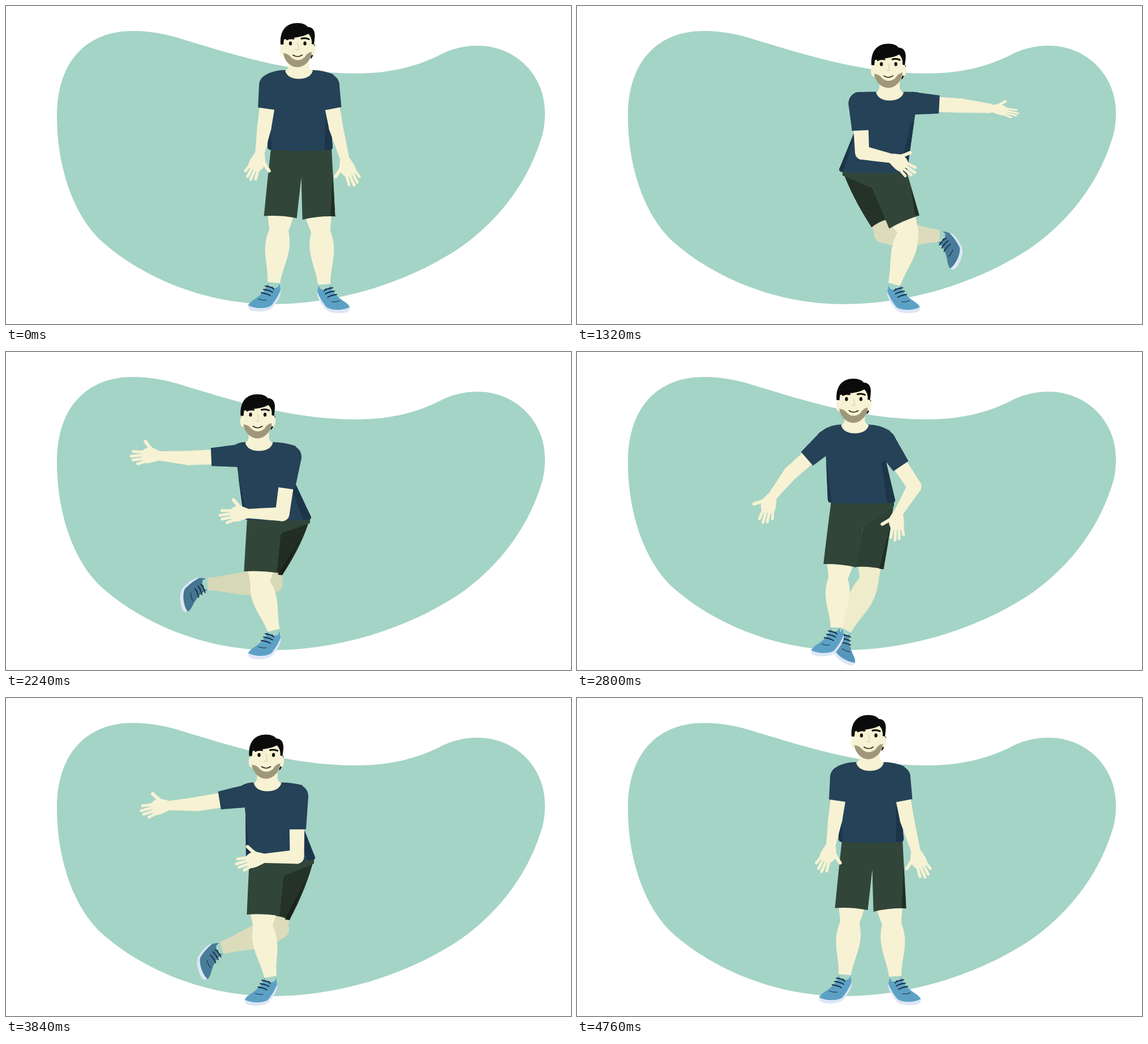
An HTML page with a canvas that plays this animation: 998x561 px, repeating every 4.8 s.

```html
<!DOCTYPE html>
<html lang="en">
<head>
<meta charset="utf-8">
<title>Side lunges</title>
<style>
html, body { margin: 0; width: 100%; height: 100%; overflow: hidden; background: #fff; }
canvas { display: block; }
</style>
</head>
<body>
<canvas id="stage" width="998" height="561"></canvas>
<script>
const ctx = document.getElementById('stage').getContext('2d');
const LOOP = 4800, STEP = 40;

const color = {
  blob: '#a4d4c6', skin: [247, 242, 211], skinFar: [215, 216, 183],
  shirt: '#254258', shirtShade: '#1d3549',
  shorts: [49, 70, 57], shortsFar: [34, 46, 36], shortsShade: '#222e24',
  shoe: [92, 161, 197], shoeFar: [68, 117, 145], sole: '#dde6f5', lace: '#182b3c',
  hair: '#0b0b0b', beard: '#a0977a'
};

// head: x, y, collar y | waist: left, right, y
// arm: shoulder, elbow, wrist, hand angle, thumb side | leg: knee, ankle, foot angle, depth
const stand = {
  head: [515, 70, 113], waist: [462, 577, 254],
  armL: [467, 140, 456, 215, 448, 262, 111, -1], armR: [569, 140, 583, 215, 599, 272, 69, 1],
  legL: [482, 396, 473, 488, 0, 0], legR: [556, 398, 562, 491, 0, 0]
};
const lungeLeft = {
  head: [444.5, 114.5, 159], waist: [420, 539, 296],
  armL: [412, 183, 322, 187, 268, 183, 178, 1], armR: [502, 185, 488, 286, 425, 285, 175, 1],
  legL: [448, 406, 473, 491, 0, 0], legR: [472, 408, 356, 409, 84, 1]
};
const lungeRight = {
  head: [554, 114, 159], waist: [463, 584, 301],
  armL: [503, 178, 508, 267, 568, 270, 17, -1], armR: [596, 178, 697, 171, 752, 166, 4, -1],
  legL: [549, 402, 670, 389, -80, 1], legR: [589, 398, 560, 491, 0, 0]
};
const swingLeft = {
  head: [515.5, 75, 114], waist: [460, 576, 254],
  armL: [466, 142, 428, 214, 459, 264, 71, -1], armR: [570, 144, 652, 191, 686, 236, 65, -1],
  legL: [471, 398, 453, 484, 0, 0], legR: [554, 398, 554, 495, 0, 0]
};
const swingRight = {
  head: [488.5, 87, 128], waist: [443, 562, 266],
  armL: [442, 157, 377, 214, 344, 256, 108, 1], armR: [543, 158, 596, 237, 567, 285, 95, 1],
  legL: [461, 399, 459, 486, 0, 0], legR: [516, 404, 474, 490, 32, .25]
};
const enterLeft = {
  head: [459.5, 104.5, 149], waist: [424, 546, 286],
  armL: [425, 173, 338, 187, 285, 190, 168, 1], armR: [514, 173, 514, 280, 453, 283, 167, 1],
  legL: [453, 402, 467, 492, 0, 0], legR: [483, 408, 381, 441, 73, .85]
};

const timeline = [
  [0, stand], [560, enterLeft], [680, lungeLeft], [920, lungeLeft], [1080, swingRight], [1150, stand],
  [1380, lungeRight], [1640, lungeRight], [1880, swingLeft], [2110, enterLeft], [2240, lungeLeft],
  [2650, lungeLeft], [2800, swingRight], [2900, stand], [3120, lungeRight], [3360, lungeRight],
  [3600, swingLeft], [3840, enterLeft], [3940, lungeLeft], [4080, lungeLeft],
  [4260, swingRight], [4480, stand], [LOOP, stand]
];

const lerp = (a, b, t) => a + (b - a) * t;
const along = (a, b, t) => [lerp(a[0], b[0], t), lerp(a[1], b[1], t)];
const mix = (a, b, t) => `rgb(${a.map((v, i) => Math.round(lerp(v, b[i], t)))})`;
const skin = mix(color.skin, color.skin, 0);

// Monotone cubic between keys: smooth passes, still holds
function channel(i, t, part, n) {
  const time = k => timeline[k][0], val = k => timeline[k][1][part][n];
  const slope = k => (val(k + 1) - val(k)) / (time(k + 1) - time(k));
  const tangent = k => {
    if (k === 0 || k === timeline.length - 1) return 0;
    const a = slope(k - 1), b = slope(k);
    return a * b <= 0 ? 0 : 2 * a * b / (a + b);
  };
  const span = time(i + 1) - time(i), u = (t - time(i)) / span, d = val(i + 1) - val(i);
  const m0 = tangent(i) * span, m1 = tangent(i + 1) * span;
  return val(i) + u * (m0 + u * (3 * d - 2 * m0 - m1 + u * (m0 + m1 - 2 * d)));
}

function poseAt(t) {
  let i = 0;
  while (timeline[i + 1][0] <= t) i++;
  const pose = {};
  for (const part in stand) pose[part] = stand[part].map((_, n) => channel(i, t, part, n));
  return pose;
}

function fill(path, style) {
  ctx.fillStyle = style;
  ctx.fill(typeof path === 'string' ? new Path2D(path) : path);
}
function stroke(path, style, width) {
  ctx.strokeStyle = style;
  ctx.lineWidth = width;
  ctx.lineCap = ctx.lineJoin = 'round';
  ctx.stroke(new Path2D(path));
}
function polygon(points, style) {
  const path = new Path2D();
  points.forEach(p => path.lineTo(...p));
  path.closePath();
  fill(path, style);
}
function disc(x, y, rx, ry, style) {
  const path = new Path2D();
  path.ellipse(x, y, rx, ry, 0, 0, 7);
  fill(path, style);
}
function at(x, y, angle, flip, draw) {
  ctx.save();
  ctx.translate(x, y);
  ctx.rotate(angle * Math.PI / 180);
  ctx.scale(...flip);
  draw();
  ctx.restore();
}

// Point beside the line a-b at fraction t, offset sideways
function beside(a, b, t, offset) {
  const dx = b[0] - a[0], dy = b[1] - a[1], len = Math.hypot(dx, dy) || 1, p = along(a, b, t);
  return [p[0] + dy / len * offset, p[1] - dx / len * offset];
}
function limb(a, b, half, style) {
  const left = [], right = [];
  for (let i = 0; i <= 12; i++) {
    left.push(beside(a, b, i / 12, half(i / 12)));
    right.unshift(beside(a, b, i / 12, -half(i / 12)));
  }
  polygon(left.concat(right), style);
}

function background() {
  ctx.fillStyle = '#fff';
  ctx.fillRect(0, 0, 998, 561);
  fill('M90 195C90 95 145 44 224 44C255 44 285 50 310 58C390 82 500 119 617 119' +
    'C685 119 730 104 765 87C785 76 808 70 833 70C900 70 952 122 952 188C952 205 950 222 944 238' +
    'C918 320 860 388 795 431C700 492 580 526 470 526C340 526 230 470 169 415C120 370 90 285 90 195Z', color.blob);
}

function shoe(style) {
  fill('M-11 1C-13 12-22 22-38 32C-46 38-47 42-43 45L-8 47C2 38 10 26 12 14L10 2L7 8Q-2 12-9 6Z', style);
  fill('M-45 40C-35 46-15 47-5 41C0 36 8 24 12 13C14 20 8 31 0 41C-3 47-12 50-22 51C-38 51-47 49-45 40Z', color.sole);
  stroke('M-15 6Q-7 7-1 10M-18 12Q-9 13-2 17M-22 18Q-13 19-6 23M-3 8L0 12', color.lace, 1.8);
  stroke('M-27 29Q-20 32-13 31', color.lace, 1);
}

function leg(pose, side, front) {
  const [kx, ky, ax, ay, turn, depth] = side < 0 ? pose.legL : pose.legR;
  const [wl, wr, wy] = pose.waist;
  const left = wl + 6, right = wr - 2;
  const hip = [lerp(wl, wr, side < 0 ? .3 : .65), wy + 11], knee = [kx, ky], ankle = [ax, ay];
  const flesh = mix(color.skin, color.skinFar, depth);

  limb(knee, ankle, t => 17 - 6 * t + 11 * Math.sin(Math.PI * t) * (1 - t), flesh);
  disc(kx, ky, 17, 17, flesh);
  at(ax, ay, turn, [-side, 1], () => shoe(mix(color.shoe, color.shoeFar, depth)));
  limb(hip, knee, t => t < .8 ? 23 - 10 * depth : 23 - 10 * depth - (t - .8) * 30 * (1 - depth), flesh);

  const width = 29 - 17 * depth;
  const outer = beside(hip, knee, .83, side * width), inner = beside(hip, knee, .81, -side * width);
  const outerTop = side < 0 ? left : right, innerTop = side < 0 ? right : left;
  const bend = pose.legL[5] + pose.legR[5];
  const crotch = [lerp(left, right, .5) + 4 * (pose.legR[5] - pose.legL[5]), wy + lerp(50, 24, Math.min(bend, 1))];
  const path = new Path2D();
  path.moveTo(outerTop, wy - 3);
  path.quadraticCurveTo(lerp(outerTop, outer[0], .5) + side * 11 * depth, lerp(wy, outer[1], .45), ...outer);
  path.quadraticCurveTo(...beside(hip, knee, .79, 0), ...inner);
  path.lineTo(...crotch);
  if (front) path.lineTo(innerTop, wy + 6);
  path.lineTo(front ? innerTop : crotch[0], wy - 3);
  path.closePath();
  fill(path, mix(color.shorts, color.shortsFar, depth));
  if (side > 0) {
    polygon([along([outerTop, wy], outer, .35), outer, [outer[0] - 8, outer[1] - 1]],
      depth > .5 ? '#1a211b' : color.shortsShade);
  }
}

function torso({ head, waist, armL, armR }) {
  const x = head[0] + 1.5, y = head[2], [wl, wr, wy] = waist;
  const path = new Path2D();
  path.moveTo(x - 25, y);
  path.quadraticCurveTo(lerp(x - 25, armL[0] - 8, .5), y, armL[0] - 8, armL[1] - 19);
  path.lineTo(armL[0] - 2, armL[1] + 32);
  path.lineTo(wl, wy - 5);
  path.quadraticCurveTo(wl, wy, wl + 6, wy);
  path.quadraticCurveTo((wl + wr) / 2, wy + 3, wr - 4, wy);
  path.quadraticCurveTo(wr, wy, wr, wy - 5);
  path.lineTo(armR[0] + 2, armR[1] + 32);
  path.lineTo(armR[0] + 10, armR[1] - 19);
  path.quadraticCurveTo(lerp(x + 25, armR[0] + 10, .5), y, x + 25, y);
  path.closePath();
  fill(path, color.shirt);
  polygon([[armL[0] - 2, armL[1] + 35], [wl, wy - 4], [wl + 7, wy]], color.shirtShade);
  polygon([[armR[0] + 2, armR[1] + 32], [wr, wy - 4], [wr - 4, wy], [wr - 14, wy], [armR[0] - 5, armR[1] + 38]], color.shirtShade);
}

function hand() {
  fill('M-4-8C6-10 18-15 27-11L30 8C24 13 16 17 8 14L-4 8Z', skin);
  stroke('M9 10Q16 18 21 26', skin, 6);
  stroke('M24 7L43 9M26 2L47 1M25-4L44-6M22-9L36-13', skin, 5);
}

function arm([sx, sy, ex, ey, wx, wy, angle, thumb]) {
  const shoulder = [sx, sy], elbow = [ex, ey], wrist = [wx, wy];
  limb(shoulder, elbow, t => 14 - 1.5 * t, skin);
  disc(ex, ey, 12.5, 12.5, skin);
  limb(elbow, wrist, t => 12.5 - 4.5 * t, skin);
  at(wx, wy, angle, [1, thumb], hand);
  disc(sx, sy, 20, 20, color.shirt);
  limb(shoulder, elbow.map((v, i) => lerp(shoulder[i], v, .55)), t => 20 - 4 * t, color.shirt);
}

function head([x, y, collar]) {
  ctx.save();
  ctx.translate(x - 515, collar - 113);
  fill('M499 92L499 106Q498 112 493 114Q497 128 517 128.5Q538 128 542 114Q536 112 535 106L535 92Z', skin);
  ctx.restore();

  ctx.save();
  ctx.translate(x - 515, y - 70);
  fill('M536 70L546 68Q544 90 538 93Z', color.hair);
  disc(489, 78, 5, 10, skin);
  disc(542, 77, 4.5, 10, skin);
  fill('M489 58C489 45 541 42 541 58L541 82C537 99 525 108 515 108C504 108 493 98 490 84Z', skin);
  fill('M490 83Q499 84 504 91Q515 100 527 91Q532 82 540 81C539 96 527 108 515 108C502 108 491 96 490 83Z', color.beard);
  fill('M485 68C483 42 496 30 515 30C524 30 530 33 533 37C542 37 546 44 545.5 54L544 68L540 67Q541 56 534 49' +
    'C522 56 505 55 491 59L490 68Z', color.hair);
  disc(502.5, 66, 2.7, 3.6, '#17120f');
  disc(528, 66, 2.7, 3.6, '#17120f');
  stroke('M496 59Q501 56 508 57.5M522 57.5Q529 55.5 535 58.5', color.hair, 3);
  stroke('M515 65L517 77L512 77', '#ddd4b6', 1.5);
  stroke('M507 86.5Q515 92 523 86.5', '#2a1d18', 1.7);
  ctx.restore();
}

function draw(t) {
  const pose = poseAt(t);
  const far = pose.legL[5] > pose.legR[5] ? -1 : 1;
  background();
  leg(pose, far, false);
  leg(pose, -far, true);
  torso(pose);
  arm(pose.armL);
  arm(pose.armR);
  head(pose.head);
}

const start = performance.now();
function tick() {
  const t = Math.max(0, performance.now() - start) % LOOP;
  draw(Math.floor(t / STEP) * STEP);
  requestAnimationFrame(tick);
}
tick();
</script>
</body>
</html>
```
